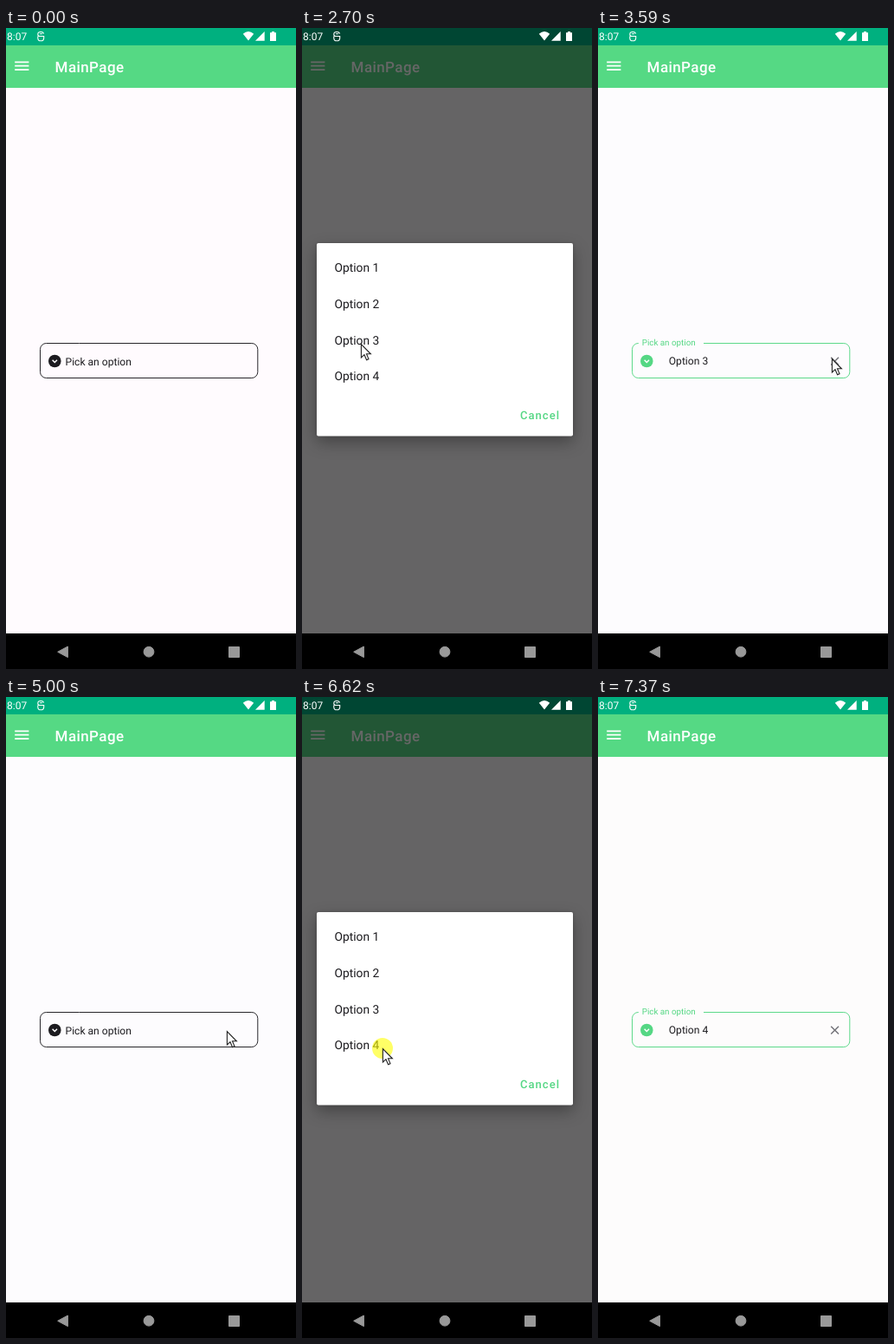
These frames come from a looping animation (335x739 px, 8310 ms). An HTML page:

```html
<!DOCTYPE html>
<html lang="en">
<head>
<meta charset="utf-8">
<title>Option picker</title>
<style>
  html, body { margin: 0; width: 100%; height: 100%; overflow: hidden; background: #000; }
  svg { display: block; width: 100%; height: 100%; }
  text { font-family: Roboto, "Noto Sans", sans-serif; text-rendering: geometricPrecision; white-space: pre; }
  .title { font-size: 17px; font-weight: 500; letter-spacing: .4px; fill: #fff; }
  .clock { font-size: 12px; fill: #fff; }
  .field { font-size: 12.1px; fill: #1c1b1f; }
  .option { font-size: 13.8px; fill: #1c1b1f; }
  .cancel { font-size: 13px; font-weight: 500; letter-spacing: 1px; fill: #55d784; }
  .card { fill: #fff; filter: drop-shadow(0 0 2px rgba(0, 0, 0, .15)) drop-shadow(0 7px 9px rgba(0, 0, 0, .32)); }
  .line { fill: none; }
</style>
</head>
<body>
<svg viewBox="0 0 335 739">
  <rect id="page" width="335" height="698"/>
  <rect width="335" height="20" fill="#00b07f"/>
  <rect y="20" width="335" height="49" fill="#55d984"/>
  <path class="line" stroke="#fff" stroke-width="1.8" d="M10.2 39.3H26.4M10.2 43.7H26.4M10.2 48.1H26.4"/>
  <text class="title" x="56.6" y="51">MainPage</text>

  <!-- picker field -->
  <path id="outline" class="line" stroke-width=".95"/>
  <circle id="badge" cx="56.3" cy="384" r="7.3"/>
  <path class="line" stroke="#fff" stroke-width="1.5" d="M53.6 382.8L56.3 385.5L59 382.8"/>
  <text id="label" class="field">Pick an option</text>
  <text id="value" class="field" x="81.8" y="388.3"></text>
  <path id="clear" class="line" stroke="#74747a" stroke-width="1.5" d="M269.2 379.7L278 388.5M278 379.7L269.2 388.5"/>

  <rect id="dim" width="335" height="698"/>

  <!-- status bar -->
  <text class="clock" x="1.1" y="14.3">8:07</text>
  <path class="line" stroke="#fff" stroke-width="1.1" d="M43.6 6.6Q43 4.5 40.2 4.5Q36.8 4.5 36.8 7.2Q36.8 9.5 39 9.5H43.7V11.7Q43.7 14.8 40.2 14.8Q36.8 14.8 36.8 11.7V9.5M39 6.8H42"/>
  <path fill="#fff" d="M273.8 6.8Q280 1.2 286.2 6.8L280 14.6ZM298.7 4V14.7H288ZM305 5.3H307V4H310V5.3H312V15H305Z"/>

  <!-- navigation bar -->
  <rect y="698" width="335" height="41"/>
  <g fill="#999" stroke="#999" stroke-linejoin="round">
    <path d="M59.7 719.3L71.4 713V725.6Z"/>
    <circle cx="165" cy="719.2" r="5.9"/>
    <rect x="257.5" y="713.5" width="12" height="12"/>
  </g>

  <g id="dialog">
    <rect class="card" x="17" y="248" width="296" height="222.5" rx="2"/>
    <g id="options"></g>
    <text class="cancel" x="252.1" y="451.2">Cancel</text>
  </g>

  <g id="pointer">
    <circle id="click" r="12" fill="#ff0" fill-opacity=".6"/>
    <path fill="#fff" stroke="#222" stroke-width="1.1" d="M.4.6V16L4 12.7L6.6 18.7L9 17.6L6.5 11.8H11.4Z"/>
  </g>
</svg>
<script>
const LOOP = 8310, REFRESH = 68;
const GREEN = '#55d784', INK = '#1c1b1f';

// The pointer travels from go to stop, then holds the button from press to release
const STEPS = [
  { go: 70, stop: 1240, x: 112, y: 391, bend: .3, press: 1440, release: 1580, kind: 'open' },
  { go: 2300, stop: 2430, x: 68, y: 364, press: 2570, release: 2700, kind: 'pick', value: 'Option 3' },
  { go: 3310, stop: 3590, x: 270, y: 381, press: 4260, release: 4530, kind: 'clear' },
  { go: 4930, stop: 5530, x: 129, y: 385, bend: .12, press: 5670, release: 5800, kind: 'open' },
  { go: 6340, stop: 6550, x: 93, y: 405, press: 6620, release: 6820, kind: 'pick', value: 'Option 4' },
  { go: 7026, stop: 7301, x: 283, y: 650 }
];
const ENTRY = { x: 295, y: 722 };
const LEAVE = STEPS.at(-1).stop + REFRESH;

const $ = id => document.getElementById(id);
const set = (id, attrs) => {
  for (const key in attrs) $(id).setAttribute(key, attrs[key]);
};
const ramp = (t, from, span) => Math.min(1, Math.max(0, (t - from) / span));
const mix = (a, b, u) => a + (b - a) * u;
const smooth = u => u * u * (3 - 2 * u);
const snap = t => Math.floor(t / REFRESH) * REFRESH;

$('options').innerHTML = [0, 1, 2, 3].map(i =>
  `<text class="option" x="37.5" y="${281 + i * 41.8}">Option ${i + 1}</text>`).join('');

// Straight or bowed travel between two stops
function pointerAt(t) {
  const i = Math.max(0, STEPS.findLastIndex(s => s.go <= t));
  const to = STEPS[i], from = STEPS[i - 1] || ENTRY;
  const u = smooth(ramp(snap(t - to.go) + REFRESH, 0, to.stop - to.go + REFRESH));
  const bow = 2 * u * (1 - u) * (to.bend || 0);
  return [
    mix(from.x, to.x, u) + bow * (to.y - from.y),
    mix(from.y, to.y, u) - bow * (to.x - from.x)
  ];
}

function drawField(color, lift, value) {
  const gap = 37.5 * lift;
  set('outline', {
    stroke: color,
    d: `M${84.5 + gap} 363.5H283.8a7 7 0 0 1 7 7V396.5a7 7 0 0 1 -7 7H46.5a7 7 0 0 1 -7 -7V370.5a7 7 0 0 1 7 -7H${84.5 - gap}`
  });
  set('badge', { fill: color });
  set('label', {
    style: `fill:${color}`,
    transform: `translate(${mix(68.5, 50.7, lift)} ${mix(388.7, 366.2, lift)}) scale(${mix(1, .81, lift)})`
  });
  $('value').textContent = value;
  set('clear', { opacity: value ? 1 : 0 });
}

function draw(t) {
  const done = STEPS.filter(s => s.release <= t);
  const { kind, value, release } = done.at(-1) || { release: 0 };
  const age = snap(t - release);
  const float = smooth(ramp(age, -40, 200));
  const fade = ramp(age, 20, 240);
  const lift = { open: float, pick: 1, clear: 1 - float }[kind] || 0;
  const shade = { open: fade ** 1.4, pick: 1 - fade }[kind] || 0;
  const show = { open: 1 - (1 - fade) ** 2, pick: 1 - fade }[kind] || 0;

  const picks = done.filter(s => s.value).length;
  set('page', { fill: ['#fffbfe', '#fdfcfe', '#fdfcfc'][picks] });
  drawField(kind === 'open' || kind === 'pick' ? GREEN : INK, lift, value && age > 0 ? value : '');
  set('dim', { opacity: .6 * shade });
  set('dialog', { opacity: show });

  set('pointer', {
    transform: `translate(${pointerAt(t).map(Math.round).join(' ')})`,
    visibility: t >= STEPS[0].go && t < LEAVE ? 'visible' : 'hidden'
  });
  set('click', { opacity: STEPS.some(s => t >= s.press && t < s.release) ? 1 : 0 });
}

const start = performance.now();
function tick() {
  draw((performance.now() - start) % LOOP);
  requestAnimationFrame(tick);
}
tick();
</script>
</body>
</html>
```
